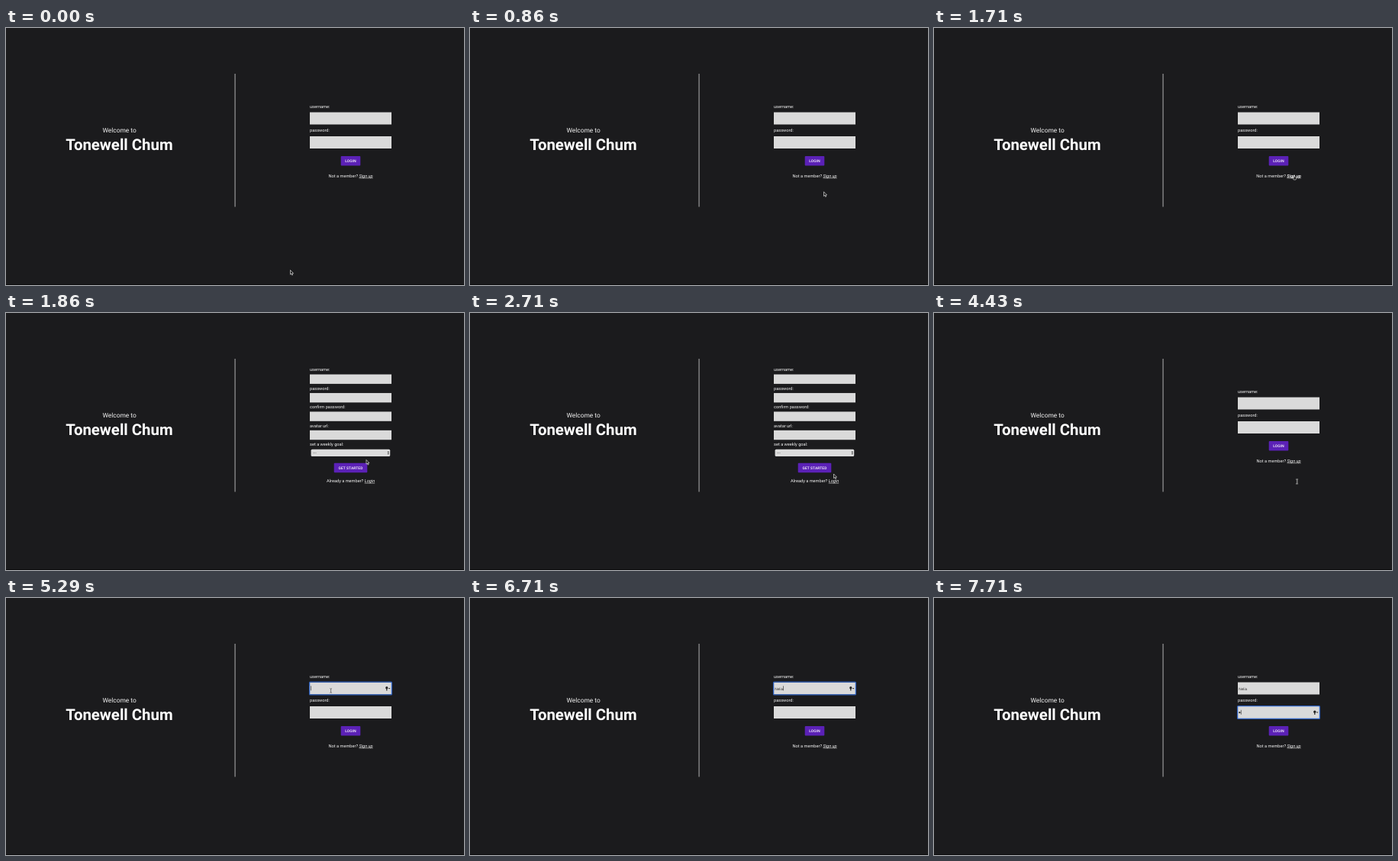
An HTML page that plays this animation: 600x337 px, repeating every 8000 ms.

```html
<!DOCTYPE html>
<html lang="en">
<head>
<meta charset="utf-8">
<title>Welcome</title>
<style>
html, body { margin: 0; width: 100%; height: 100%; overflow: hidden; background: #1b1b1d; }
svg { display: block; width: 600px; height: 337px; }
text { font-family: Roboto, sans-serif; font-size: 5.65px; fill: #f2f2f2; text-rendering: geometricPrecision; white-space: pre; }
.mid { text-anchor: middle; }
.btn { font-size: 4.83px; font-weight: 500; letter-spacing: .0286em; fill: #fff; }
.link { font-style: italic; text-decoration: underline; }
.hover .link { font-weight: 700; }
.typed { font-family: "Liberation Sans", Arial, sans-serif; font-size: 4.8px; fill: #333; }
.field { fill: #dadada; }
</style>
</head>
<body>
<svg id="stage" viewBox="0 0 600 337">
  <rect width="600" height="337" fill="#1b1b1d"/>
  <rect y="336" width="600" height="1" fill="#0b0b0c"/>
  <text class="mid" x="148.6" y="137" style="font-size:8.4px">Welcome to</text>
  <text class="mid" x="148.5" y="159.8" style="font-size:20.4px;font-weight:700;fill:#fff">Tonewell Chum</text>
  <rect x="299.6" y="60" width=".9" height="174.5" fill="#c4c4c4"/>
  <g id="login"></g>
  <g id="signup"></g>
  <g id="focus">
    <rect x="397.6" y="-.4" width="107.8" height="16.8" rx="1" fill="none" stroke="#2f62c0" stroke-width="1.3"/>
    <g fill="#222">
      <circle cx="498.8" cy="7.2" r="1.6"/>
      <rect x="498.2" y="8" width="1.2" height="3"/>
      <path d="M500.8 7.4h2.6l-1.3 1.6z"/>
    </g>
    <rect id="caret" y="4.8" width=".6" height="6" fill="#222"/>
  </g>
  <text id="name" class="typed" x="399.2" y="120.5"></text>
  <circle id="dot" cx="400.4" cy="150.2" r="1.1" fill="#222"/>
  <g id="cursor">
    <path id="arrow" d="M0 0V5.7L1.3 4.5 2.2 6.6 3.1 6.2 2.2 4.2H4z" fill="#111" stroke="#fff" stroke-width=".6"/>
    <path id="hand" d="M-.5 .4Q0-.3 .5 .4V2.4L2.6 3V5L2 6.5H-.9L-2.2 4 -.5 4.2z" fill="#222" stroke="#fff" stroke-width=".5"/>
    <g id="beam" fill="none">
      <path d="M-1.3-2.8Q0-2.8 0-2Q0-2.8 1.3-2.8M0-2V2M-1.3 2.8Q0 2.8 0 2Q0 2.8 1.3 2.8" stroke="#ddd" stroke-width="1.3"/>
      <path d="M-1.3-2.8Q0-2.8 0-2Q0-2.8 1.3-2.8M0-2V2M-1.3 2.8Q0 2.8 0 2Q0 2.8 1.3 2.8" stroke="#333" stroke-width=".6"/>
    </g>
  </g>
</svg>
<script>
const $ = id => document.getElementById(id);
const LOOP = 8000, FPS = 7, NAME = "Nelia";

const label = (y, s) => `<text x="398" y="${y}">${s}</text>`;
const field = (y, h) => `<rect class="field" x="398" y="${y}" width="107" height="${h}"/>`;
const button = (y, w, s) =>
  `<rect x="${451.5 - w / 2}" y="${y}" width="${w}" height="12.5" rx="1" fill="#5b21b6"/>` +
  `<text class="mid btn" x="451.5" y="${y + 8}">${s}</text>`;
const foot = (y, s, link) =>
  `<text class="mid" x="451.6" y="${y}">${s} <tspan class="link">${link}</tspan></text>`;

$("login").innerHTML =
  label(104.8, "username:") + field(110.5, 16) +
  label(136.3, "password:") + field(142, 16) +
  button(168, 25.6, "LOGIN") + foot(195.6, "Not a member?", "Sign up");

$("signup").innerHTML =
  ["username:", "password:", "confirm password:", "avatar url:"]
    .map((s, i) => label(76.2 + i * 24.45, s) + field(80.5 + i * 24.45, 12.4)).join("") +
  label(174, "set a weekly goal:") +
  `<rect x="399.6" y="178.8" width="103.6" height="9.2" rx="1.5" fill="#dcdcdc"/>
   <text class="typed" x="402" y="184.7">---</text>
   <path d="M499.6 182.9l1.2-1.7 1.2 1.7zM499.6 183.9l1.2 1.7 1.2-1.7z" fill="#222"/>` +
  button(196.8, 43.6, "GET STARTED") + foot(221.8, "Already a member?", "Login");

// pointer stops: tick, x, y
const stops = [
  [0, 372.5, 317.5], [1, 432, 262], [2, 455, 237], [4, 455, 237],
  [8, 472, 192.5], [18, 472, 192.5], [19, 476.5, 211], [21, 476, 217.5],
  [23, 476, 217.5], [25, 477, 222], [26, 477, 222], [28, 475.8, 217.5],
  [30, 475.8, 217.5], [31, 475.6, 221], [32, 475.6, 221], [36, 425.6, 121.5]
];
const keys = [40, 42, 43, 46, 47];

function pointer(k) {
  const i = stops.findIndex(s => s[0] > k);
  if (i < 0) return stops[stops.length - 1].slice(1);
  const [a, ax, ay] = stops[i - 1], [b, bx, by] = stops[i];
  const u = (k - a) / (b - a), e = u * u * (3 - 2 * u);
  return [ax + (bx - ax) * e, ay + (by - ay) * e];
}

const show = (id, on) => $(id).setAttribute("display", on ? "inline" : "none");
const within = (k, a, b) => k >= a && k < b;

function draw(ms) {
  // the screen refreshes seven times a second, on 10 ms marks
  let k = Math.floor(ms * FPS / 1000) + 1;
  while (Math.round(k * 100 / FPS) * 10 > ms) k--;

  const signup = within(k, 13, 31);
  show("login", !signup);
  show("signup", signup);
  $("login").classList.toggle("hover", within(k, 8, 13));
  const back = within(k, 20, 25) || within(k, 27, 31);
  $("signup").classList.toggle("hover", back);

  const [x, y] = pointer(k);
  const hand = within(k, 8, 13) || back;
  const beam = k >= 31;
  $("cursor").setAttribute("transform", `translate(${x} ${y})`);
  show("cursor", k < 40);
  show("hand", hand);
  show("beam", beam);
  show("arrow", !hand && !beam);

  const second = k >= 49, dot = k >= 53;
  const name = NAME.slice(0, keys.filter(t => k >= t).length);
  $("name").textContent = name;
  show("dot", dot);
  show("focus", k >= 37);
  $("focus").setAttribute("transform", `translate(0 ${second ? 142 : 110.5})`);
  const typed = second ? (dot ? 2.7 : 0) : name ? $("name").getComputedTextLength() : 0;
  $("caret").setAttribute("x", 399.2 + typed);
}

const start = performance.now();
function frame() {
  draw((performance.now() - start) % LOOP);
  requestAnimationFrame(frame);
}
frame();
</script>
</body>
</html>
```
